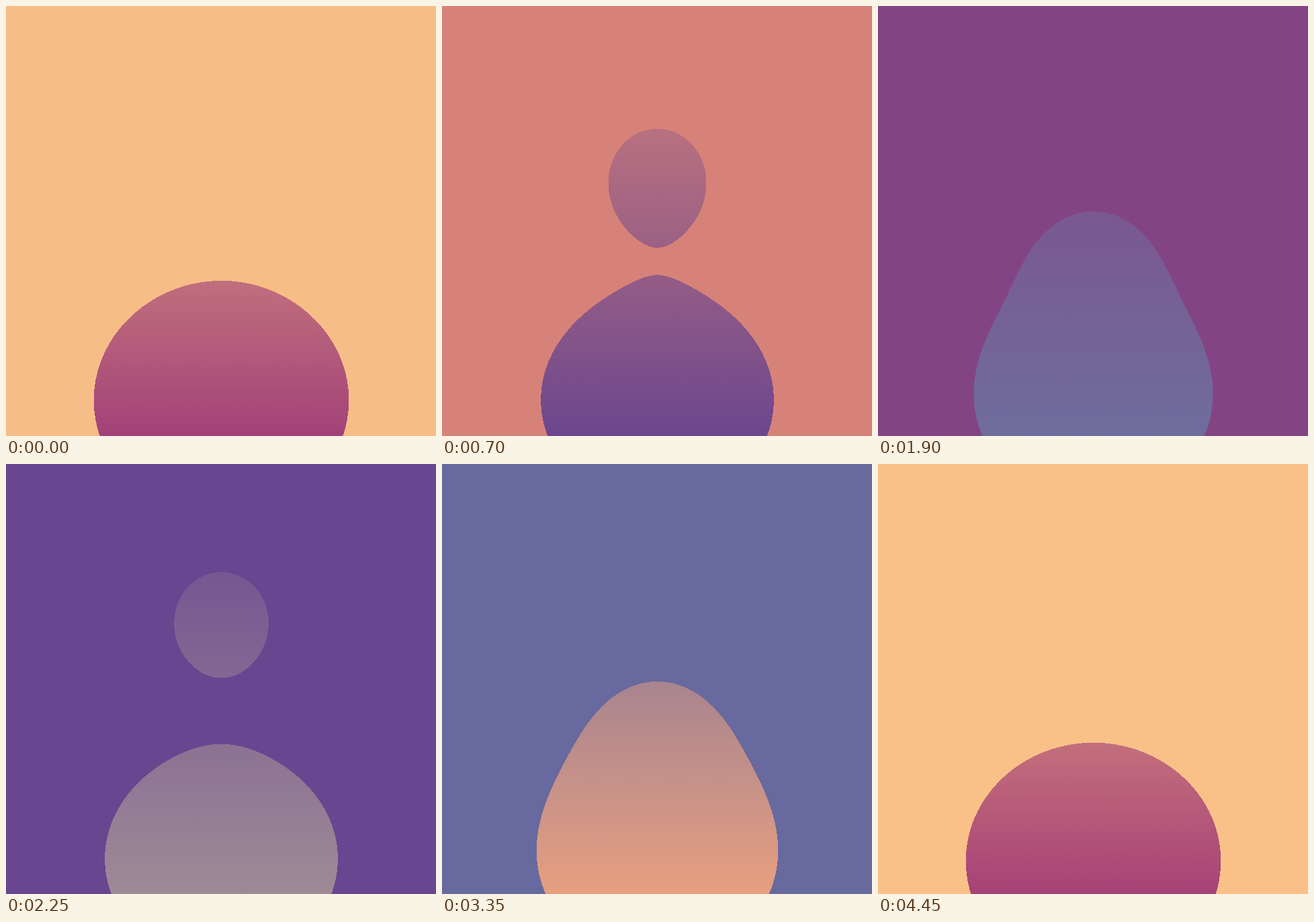
These frames come from a looping animation (640 px wide and 640 px high, 4500 ms). An HTML page with a canvas:

```html
<!DOCTYPE html>
<html lang="en">
<head>
<meta charset="utf-8">
<title>Rising blobs</title>
<style>
  html, body { margin: 0; width: 100%; height: 100%; overflow: hidden; }
  canvas { display: block; width: 100vw; height: 100vh; }
</style>
</head>
<body>
<canvas id="stage" width="640" height="640"></canvas>
<script>
const ctx = document.getElementById('stage').getContext('2d');
const SIZE = 640, MID = 320.5;
const CYCLE = 1500, LOOP = 3 * CYCLE, STEP = 50;
const SOFT = 75; // reach of the pull between blobs

// Sky colours, evenly spread over the loop
const SKY = ['#f9c187', '#d78279', '#a64276', '#6c468e', '#3347a7', '#978697']
  .map(hex => [1, 3, 5].map(i => parseInt(hex.slice(i, i + 2), 16)));

const BASE = { y: 586, rx: 171, ry: 151.5 };

function sky(time) {
  const pos = (time + STEP) / LOOP * SKY.length;
  const i = Math.floor(pos), k = pos - i;
  const a = SKY[i % SKY.length], b = SKY[(i + 1) % SKY.length];
  return `rgb(${a.map((v, c) => Math.round(v + (b[c] - v) * k))})`;
}

// A ball leaves the base at age 0, rises steadily and shrinks on its way
const ball = age => ({
  y: BASE.y - 0.473 * age,
  rx: 77.2 - 0.0157 * age,
  ry: 85.7 - 0.0225 * age
});

function pull(blob, x, y) {
  const dy = y - blob.y + 1e-4;
  const n = Math.hypot(x / blob.rx, dy / blob.ry);
  const gap = Math.hypot(x, dy) * (1 - 1 / n);
  return Math.exp(-gap / SOFT);
}

// Half width of the merged shape at height y, by bisection
function halfWidth(blobs, y) {
  const inside = x => blobs.reduce((sum, b) => sum + pull(b, x, y), 0) >= 1;
  if (!inside(0)) return 0;
  let lo = 0, hi = SIZE / 2;
  for (let i = 0; i < 11; i++) {
    const x = (lo + hi) / 2;
    if (inside(x)) lo = x; else hi = x;
  }
  return lo;
}

function draw(time) {
  const phase = time % CYCLE;
  const blobs = [BASE, ball(phase), ball(phase - CYCLE)];
  const top = sky(time);

  ctx.fillStyle = top;
  ctx.fillRect(0, 0, SIZE, SIZE);

  const fill = ctx.createLinearGradient(0, 0, 0, SIZE);
  fill.addColorStop(0, top);
  fill.addColorStop(1, sky(time + CYCLE));
  ctx.fillStyle = fill;
  for (let y = 0; y < SIZE; y++) {
    const w = halfWidth(blobs, y);
    if (!w) continue;
    const x = Math.round(MID - w);
    ctx.fillRect(x, y, Math.round(MID + w) - x, 1);
  }
}

const start = performance.now();
let shown = -1;

function tick() {
  const elapsed = Math.max(0, performance.now() - start) % LOOP;
  const time = Math.floor(elapsed / STEP) * STEP;
  if (time !== shown) draw(shown = time);
  requestAnimationFrame(tick);
}
tick();
</script>
</body>
</html>
```
